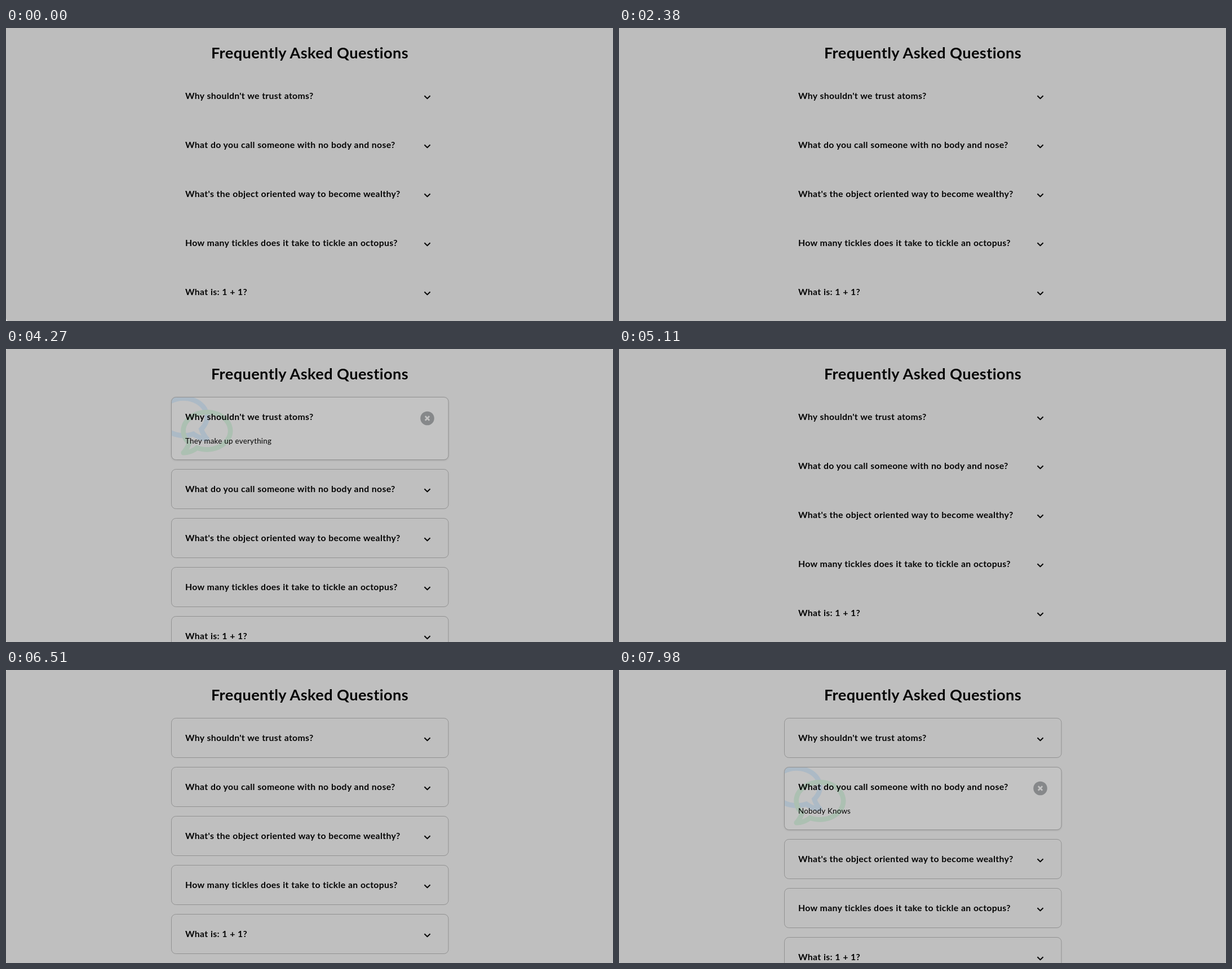
An HTML page for the animation above (8 s loop, 1077 by 520 pixels).

```html
<!DOCTYPE html>
<html lang="en">
<head>
<meta charset="utf-8">
<title>Frequently Asked Questions</title>
<style>
  html, body { margin: 0; width: 100%; height: 100%; overflow: hidden; background: #bdbdbd; }
  svg { display: block; width: 1077px; height: 520px; }
  text { font-family: Lato, "Open Sans", sans-serif; fill: #050505; }
  .title { font-size: 27.2px; font-weight: 700; letter-spacing: .0145em; }
  .question { font-size: 15.8px; font-weight: 700; letter-spacing: .0205em; word-spacing: .016em; }
  .answer { font-size: 13.4px; letter-spacing: .016em; word-spacing: .016em; }
  .fill { fill: #c3c3c3; filter: drop-shadow(0 1.5px 1.5px rgba(0, 0, 0, .16)); }
  .border { fill: none; stroke: #929292; }
  .chevron { fill: none; stroke: #080808; stroke-width: 2; stroke-linejoin: round; }
  .cross { stroke: #c4c4c4; stroke-width: 2.7; }
</style>
</head>
<body>
<svg id="stage" viewBox="0 0 1077 520"></svg>
<script>
const LOOP = 8000;
const FADE = 280;
const CARD = { x: 293.5, y: 85.5, w: 491.5, closed: 70, open: 111, gap: 17 };
const FAQS = [
  ["Why shouldn't we trust atoms?", "They make up everything"],
  ["What do you call someone with no body and nose?", "Nobody Knows"],
  ["What's the object oriented way to become wealthy?"],
  ["How many tickles does it take to tickle an octopus?"],
  ["What is: 1 + 1?"]
];
// Spans during which a card is open
const OPENINGS = [
  { card: 0, from: 2450, to: 4340 },
  { card: 1, from: 6580, to: LOOP }
];
// Spans during which the card outlines are shown
const OUTLINES = [
  { from: 2450, to: 5040, fade: 0 },
  { from: 5180, to: LOOP, fade: 210 }
];
const BUBBLE = "M256 32C115 32 0 125 0 240c0 48 20 91 53 126C38 406 7 439 6 440" +
  "c-12 13-4 40 18 40 62 0 110-26 139-46 29 9 60 14 93 14 141 0 256-93 256-208S397 32 256 32z" +
  "M256 400c-27 0-53-4-78-12l-23-7-20 14c-14 10-34 21-57 29 7-12 14-26 20-40l10-29-20-21" +
  "C70 314 48 282 48 240c0-88 93-160 208-160s208 72 208 160-93 160-208 160z";

const stage = document.getElementById("stage");

function add(parent, tag, attrs, content) {
  const el = document.createElementNS("http://www.w3.org/2000/svg", tag);
  for (const key in attrs) el.setAttribute(key, attrs[key]);
  if (content) el.textContent = content;
  return parent.appendChild(el);
}

const set = (el, key, value) => el.setAttribute(key, value);
const show = (el, visible) => set(el, "visibility", visible ? "visible" : "hidden");
const clamp = v => Math.max(0, Math.min(1, v));
const ramp = (t, from, length) => length ? clamp((t - from) / length) : 1;
const easeOut = p => 1 - (1 - p) ** 2;
const active = (spans, t) => spans.find(s => t >= s.from && t < s.to);

const page = add(stage, "rect", { width: 1077, height: 520 });
const corners = add(stage, "path", {
  d: "M0 0H3Q0 0 0 3zM1077 0V3Q1077 0 1074 0zM1077 520H1074Q1077 520 1077 517zM0 520V517Q0 520 3 520z",
  fill: "#dedede"
});
const startCorner = add(stage, "path", { d: "M0 520V514Q0 520 5 520z", fill: "#ededed" });
add(stage, "text", { class: "title", x: 539, y: 54, "text-anchor": "middle" }, "Frequently Asked Questions");

const clip = add(add(stage, "defs", {}), "clipPath", { id: "card" });
add(clip, "rect", { width: CARD.w, height: CARD.open, rx: 8 });

function makeCard([question, answer]) {
  const group = add(stage, "g", {});
  const box = cls => add(group, "rect", { class: cls, width: CARD.w, height: CARD.closed, rx: 8 });
  const fill = box("fill");
  const bubbles = add(group, "g", { "clip-path": "url(#card)", opacity: .2 });
  add(bubbles, "path", { d: BUBBLE, fill: "#5096d2", transform: "translate(67.5 -8.2) scale(-.18 .18)" });
  add(bubbles, "path", { d: BUBBLE, fill: "#50b46e", transform: "translate(16.8 16.6) scale(.18)" });
  const border = box("border");
  add(group, "text", { class: "question", x: 24.5, y: 40.5 }, question);
  const reply = add(group, "text", { class: "answer", x: 24.5, y: 82.5 }, answer);
  const chevron = add(group, "path", { class: "chevron", d: "M448.9 34.8L454 39.8L459.1 34.8" });
  const close = add(group, "g", {});
  add(close, "circle", { cx: 454, cy: 37.5, r: 12.3, fill: "#86888a" });
  add(close, "path", { class: "cross", d: "M450.3 33.8l7.4 7.4m0-7.4l-7.4 7.4" });
  return { group, fill, border, chevron, extras: [bubbles, reply, close] };
}

const cards = FAQS.map(makeCard);

function render(t) {
  const opening = active(OPENINGS, t);
  const outline = active(OUTLINES, t);
  const crisp = outline ? ramp(t, outline.from, outline.fade) : 0;
  const grey = 189 + 2 * crisp;
  set(page, "fill", `rgb(${grey}, ${grey}, ${grey})`);
  set(corners, "opacity", crisp);
  show(startCorner, t < 2100);

  let y = CARD.y;
  cards.forEach((card, i) => {
    const open = Boolean(opening) && opening.card === i;
    const height = open ? CARD.open : CARD.closed;
    set(card.group, "transform", `translate(${CARD.x} ${y})`);
    set(card.fill, "height", height);
    set(card.border, "height", height);
    set(card.fill, "opacity", open ? easeOut(ramp(t, opening.from, FADE)) : 0);
    set(card.border, "opacity", crisp);
    card.extras.forEach(el => show(el, open));
    show(card.chevron, !open);
    y += height + CARD.gap;
  });
}

const start = performance.now();
function tick() {
  render((performance.now() - start) % LOOP);
  requestAnimationFrame(tick);
}
render(0);
tick();
</script>
</body>
</html>
```
